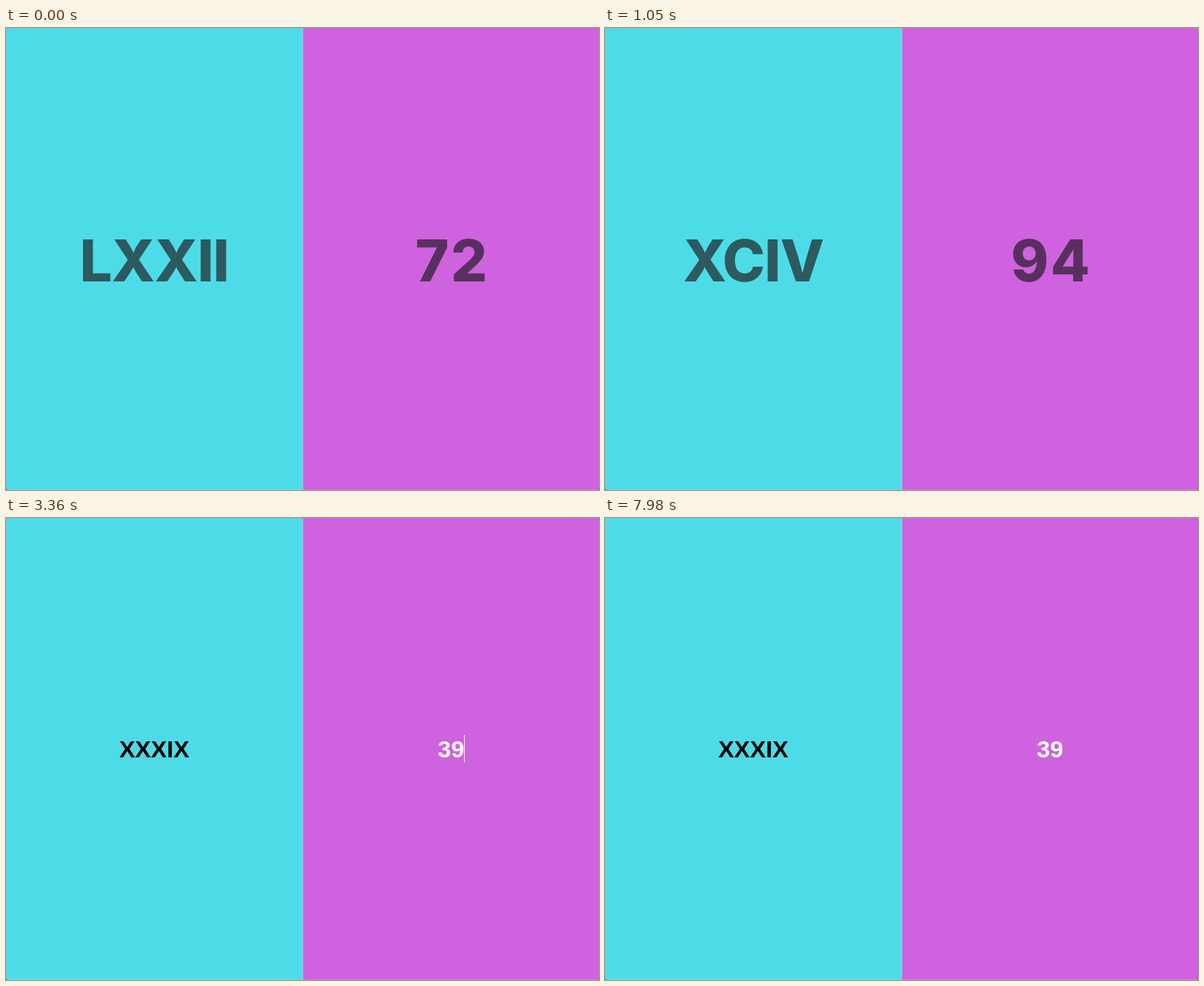
An HTML page for the animation above (8 s loop, 848 px wide and 660 px high).

```html
<!DOCTYPE html>
<html lang="en">
<head>
<meta charset="utf-8">
<title>Roman and Arabic numbers</title>
<style>
  html, body { margin: 0; width: 100%; height: 100%; overflow: hidden; }
  svg { display: block; width: 848px; height: 660px; }
  text { text-anchor: middle; font-weight: 700; }
  .big { font: 800 82px Inter, sans-serif; font-optical-sizing: none; }
  #bigRoman { letter-spacing: -.012em; }
  #bigArabic { letter-spacing: .03em; }
  .field { font-family: "Liberation Sans", Arial, sans-serif; font-size: 34px; }
</style>
</head>
<body>
<svg viewBox="0 0 848 660">
  <rect width="424" height="660" fill="#4ddce7"/>
  <rect x="424" width="424" height="660" fill="#cf62de"/>
  <rect x="424" width="1" height="660" fill="#b0b8ec"/>
  <rect y="659" width="848" height="1" fill="#fff" opacity=".2"/>
  <path d="M0 658v2h2zM848 658v2h-2z" fill="#333" opacity=".6"/>
  <text id="bigRoman" class="big" x="212" y="362" fill="#2c5a5f"/>
  <text id="bigArabic" class="big" x="638" y="362" fill="#58305f"/>
  <text id="roman" class="field" x="212" y="342" fill="#000"/>
  <text id="arabic" class="field" x="636.5" y="342"/>
  <rect id="caret" y="310" width="1" height="39" fill="#fff"/>
</svg>
<script>
const LOOP = 8000, STEP = 70, BLINK = 500;
const COUNT_FROM = 72, COUNT_TO = 99, COUNT_END = 1836;
const FOCUS = 1880;
const typed = [[2580, 3], [3140, 39], [3640, 399], [4180, 3999], [7340, 399], [7970, 39]];
// The caret restarts its blink on focus and on every key but the last.
const caretResets = [FOCUS, ...typed.slice(0, -1).map(([time]) => time)];
const $ = id => document.getElementById(id);

function toRoman(n) {
  const numerals = { M: 1000, CM: 900, D: 500, CD: 400, C: 100, XC: 90, L: 50, XL: 40, X: 10, IX: 9, V: 5, IV: 4, I: 1 };
  let out = "";
  for (const [letters, value] of Object.entries(numerals)) {
    while (n >= value) { out += letters; n -= value; }
  }
  return out;
}

function setText(id, value) {
  const node = $(id);
  if (node.textContent !== String(value)) node.textContent = value;
}

function render(time) {
  const t = Math.floor(time / STEP) * STEP;
  const left = Math.max(0, 1 - t / COUNT_END);
  const count = Math.round(COUNT_TO - (COUNT_TO - COUNT_FROM) * left * left);
  const focused = t >= FOCUS;
  const key = typed.filter(([at]) => at <= t).pop();
  const value = key ? key[1] : "";

  setText("bigRoman", key ? "" : toRoman(count));
  setText("bigArabic", focused ? "" : count);
  setText("roman", key ? toRoman(value) : "");
  setText("arabic", key ? value : focused ? "Type Arabic Number" : "");
  $("arabic").setAttribute("fill", key ? "#fff" : "#f6cffa");

  const reset = caretResets.filter(at => at <= t).pop();
  const lit = focused && Math.floor((t - reset) / BLINK) % 2 === 0;
  const width = key ? $("arabic").getComputedTextLength() : 0;
  $("caret").setAttribute("x", Math.round(636.5 + width / 2));
  $("caret").setAttribute("visibility", lit ? "visible" : "hidden");
}

const start = performance.now();
function tick() {
  render((performance.now() - start) % LOOP);
  requestAnimationFrame(tick);
}
tick();
</script>
</body>
</html>
```
